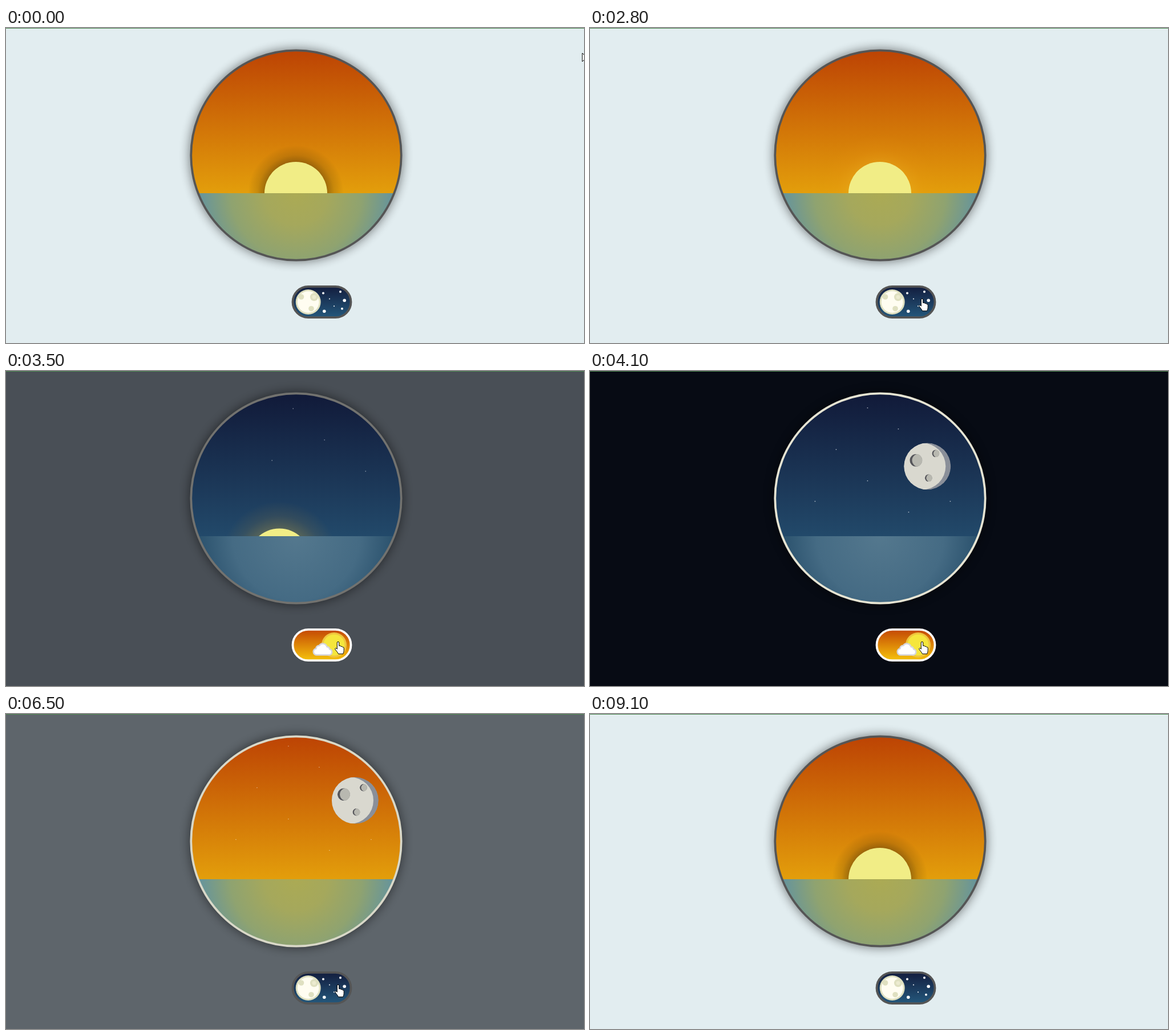
An HTML page that plays this animation: 1013 by 553 pixels, repeating every 9.2 s.

```html
<!DOCTYPE html>
<html lang="en">
<head>
<meta charset="utf-8">
<title>Day and night</title>
<style>
html, body { margin: 0; width: 100%; height: 100%; overflow: hidden; }
svg { display: block; width: 1013px; height: 553px; }
</style>
</head>
<body>
<svg viewBox="0 0 1013 553">
  <defs>
    <linearGradient id="daySky" gradientUnits="userSpaceOnUse" x1="0" y1="41" x2="0" y2="290">
      <stop stop-color="#bd4404"/><stop offset="1" stop-color="#e39e0b"/>
    </linearGradient>
    <linearGradient id="nightSky" gradientUnits="userSpaceOnUse" x1="0" y1="41" x2="0" y2="290">
      <stop stop-color="#111a39"/><stop offset="1" stop-color="#22496a"/>
    </linearGradient>
    <radialGradient id="daySea" gradientUnits="userSpaceOnUse" cx="508.5" cy="290" r="185">
      <stop stop-color="#abaa54"/><stop offset=".3" stop-color="#a5a85c"/>
      <stop offset=".62" stop-color="#8fa370"/><stop offset="1" stop-color="#5a90a8"/>
    </radialGradient>
    <radialGradient id="nightSea" gradientUnits="userSpaceOnUse" cx="508.5" cy="290" r="180">
      <stop stop-color="#54788e"/><stop offset=".62" stop-color="#456b84"/><stop offset="1" stop-color="#274e6a"/>
    </radialGradient>
    <radialGradient id="dark">
      <stop offset=".64" stop-color="#3c280a" stop-opacity=".42"/>
      <stop offset=".8" stop-color="#3c280a" stop-opacity=".16"/>
      <stop offset="1" stop-color="#3c280a" stop-opacity="0"/>
    </radialGradient>
    <radialGradient id="gold">
      <stop offset=".53" stop-color="#f0b428" stop-opacity=".25"/>
      <stop offset=".75" stop-color="#f0a018" stop-opacity=".09"/>
      <stop offset="1" stop-color="#f0a018" stop-opacity="0"/>
    </radialGradient>
    <linearGradient id="dayPill" x2="0" y2="1"><stop stop-color="#c44704"/><stop offset="1" stop-color="#f5c30c"/></linearGradient>
    <linearGradient id="nightPill" x2="0" y2="1"><stop stop-color="#131d3e"/><stop offset="1" stop-color="#24587c"/></linearGradient>
    <filter id="blur" x="-20%" y="-20%" width="140%" height="140%"><feGaussianBlur stdDeviation="9"/></filter>
    <clipPath id="port"><circle cx="508.5" cy="223.5" r="183.5"/></clipPath>
    <clipPath id="disc"><circle r="41"/></clipPath>
  </defs>

  <rect id="back" width="1013" height="553"/>
  <rect width="1013" height="1" fill="#4f8a52"/>
  <circle cx="508.5" cy="223.5" r="187" opacity=".48" filter="url(#blur)"/>

  <g clip-path="url(#port)">
    <rect id="sky" x="320" y="35" width="380" height="256"/>
    <g id="stars" fill="#fff"></g>
    <g id="moon">
      <g clip-path="url(#disc)">
        <circle r="41" fill="#8a8f99"/>
        <circle cx="-9" r="41" fill="#d9d8cf"/>
      </g>
      <g id="craters"></g>
    </g>
    <g id="sun">
      <circle id="goldGlow" r="103" fill="url(#gold)"/>
      <circle id="darkGlow" r="84" fill="url(#dark)"/>
      <circle r="55" fill="#f1ed86"/>
    </g>
    <rect id="sea" x="320" y="290" width="380" height="120"/>
  </g>
  <circle id="ring" cx="508.5" cy="223.5" r="184.2" fill="none" stroke-width="3.7"/>

  <g id="nightButton">
    <rect x="502.5" y="453.8" width="102" height="54.4" rx="27.2" fill="url(#nightPill)" stroke="#555" stroke-width="3.8"/>
    <circle cx="529.7" cy="481" r="22" fill="#dfe0c0"/>
    <circle cx="529.7" cy="481" r="19" fill="#fffdf1"/>
    <g fill="#dfe0c0">
      <circle cx="517.5" cy="472" r="4.8"/><circle cx="540" cy="472.3" r="7"/><circle cx="535" cy="492.7" r="4.8"/>
    </g>
    <circle cx="540" cy="472.3" r="3.4" fill="#ecebd0"/>
    <g id="buttonStars" fill="#fff"></g>
  </g>
  <g id="dayButton">
    <rect x="502.5" y="453.8" width="102" height="54.4" rx="27.2" fill="url(#dayPill)" stroke="#fff" stroke-width="3.8"/>
    <circle cx="575" cy="481" r="22" fill="#efc53f"/>
    <circle cx="575" cy="481" r="18.6" fill="#f5e63c"/>
    <path d="M544 498.500a5.700 5.700 0 0 1-.5-11.300a5 5 0 0 1 5.500-5.200a7.500 7.500 0 0 1 13.500 2.200a4.300 4.300 0 0 1 4.500 4a5.200 5.200 0 0 1-.5 10.300z"
      fill="#fff" stroke="#d6d6dc" stroke-width="2.500" stroke-linejoin="round"/>
  </g>

  <g id="cursor" fill="#fff" stroke="#000" stroke-linejoin="round">
    <path id="arrow" d="M0 0V15l3.500-3.300 2.300 5.300 2.400-1-2.300-5.200h5z"/>
    <path id="hand" d="M-1.700 2a1.700 1.700 0 0 1 3.400 0v5.500q3-1 3.300 1.200q2.500-.8 2.900 1q2.500-.2 2.300 2v4q0 2.500-1.600 6h-8q-1-2.500-5.300-7.500q-1.300-2 .2-2.600q1.300-.3 2.800 1.600z"/>
  </g>
</svg>
<script>
const LOOP = 9200, STEP = 100;
const TO_NIGHT = 3190, TO_DAY = 6280;
const $ = id => document.getElementById(id);
const clamp = v => Math.max(0, Math.min(1, v));
const ramp = (t, from, to) => clamp((t - from) / (to - from));

function bezier(x1, y1, x2, y2) {
  const at = (a, b, s) => 3 * (1 - s) * (1 - s) * s * a + 3 * (1 - s) * s * s * b + s * s * s;
  return x => {
    if (x <= 0 || x >= 1) return clamp(x);
    let lo = 0, hi = 1;
    for (let i = 0; i < 24; i++) {
      const mid = (lo + hi) / 2;
      if (at(x1, x2, mid) < x) lo = mid; else hi = mid;
    }
    return at(y1, y2, lo);
  };
}
const ease = bezier(.25, .1, .25, 1);
const easeInOut = bezier(.42, 0, .58, 1);

// 0 by day, 1 by night
const night = (t, duration, curve) => t < TO_DAY
  ? curve((t - TO_NIGHT) / duration)
  : 1 - curve((t - TO_DAY) / duration);

const mix = (a, b, k) => `rgb(${a.map((v, i) => Math.round(v + (b[i] - v) * k))})`;
const move = (id, x, y) => $(id).setAttribute('transform', `translate(${x} ${y})`);
const show = (id, on) => $(id).setAttribute('visibility', on ? 'visible' : 'hidden');

$('stars').innerHTML = [[472, 78], [526, 115], [417, 151], [472, 206], [380, 242], [617, 242], [544, 261]]
  .map(([x, y]) => `<rect x="${x}" y="${y}" width="1.5" height="1"/>`).join('');
$('buttonStars').innerHTML = [[556, 465.5, 2], [586, 463, 2], [567, 475.5, 1], [593.2, 478.2, 2.8],
  [575, 488.3, 1], [589, 492.7, 2], [557.8, 497.3, 2.8]]
  .map(([x, y, r]) => `<circle cx="${x}" cy="${y}" r="${r}"/>`).join('');
$('craters').innerHTML = [[-20, -10.5, 11], [14.5, -22.5, 6.5], [2, 20.5, 6.5]]
  .map(([x, y, r], i) => `<clipPath id="pit${i}"><circle cx="${x}" cy="${y}" r="${r}"/></clipPath>
    <g clip-path="url(#pit${i})"><circle cx="${x}" cy="${y}" r="${r}" fill="#55555a"/>
    <circle cx="${x + r * .38}" cy="${y}" r="${r}" fill="#b8b8b0"/></g>`).join('');

// time, x, y
const cursorPath = [[0, 1010, 44], [100, 1010, 44], [500, 760, 330], [1000, 597, 452], [1500, 597, 452],
  [2400, 596, 467], [2800, 582, 475], [7250, 582, 475], [7600, 640, 468], [7900, 860, 388],
  [8100, 960, 330], [8200, 985, 282], [8500, 1016, 222], [LOOP, 1016, 222]];

function cursorAt(t) {
  const i = cursorPath.findIndex(p => p[0] > t);
  const [t0, x0, y0] = cursorPath[i - 1], [t1, x1, y1] = cursorPath[i];
  const k = ramp(t, t0, t1);
  return [x0 + (x1 - x0) * k, y0 + (y1 - y0) * k];
}

function draw(t) {
  const isNight = t >= TO_NIGHT && t < TO_DAY;
  const fade = night(t, 500, easeInOut);
  const travel = night(t, 1500, ease);

  $('back').setAttribute('fill', mix([226, 237, 240], [7, 11, 20], fade));
  $('ring').setAttribute('stroke', mix([85, 85, 85], [232, 230, 213], night(t, 1000, easeInOut)));
  $('sky').setAttribute('fill', isNight ? 'url(#nightSky)' : 'url(#daySky)');
  $('sea').setAttribute('fill', isNight ? 'url(#nightSea)' : 'url(#daySea)');
  show('nightButton', !isNight);
  show('dayButton', isNight);

  move('sun', 508 - 93 * travel, 290 + 134 * travel);
  move('moon', 558 + 302 * (1 - travel), 192.5 - 228 * (1 - travel));
  move('stars', 124 * (1 - travel), -124 * (1 - travel));
  $('stars').setAttribute('opacity', fade);

  $('darkGlow').setAttribute('opacity', t < TO_DAY ? 1 - ramp(t, 0, 1000) : ramp(t, 7200, 9000));
  $('goldGlow').setAttribute('opacity', t < TO_DAY ? ramp(t, 0, 1000) : 0);

  const [x, y] = cursorAt(t);
  const overButton = x > 501 && x < 606 && y > 454 && y < 510;
  move('cursor', x, y);
  show('hand', overButton);
  show('arrow', !overButton);
}

const start = performance.now();
function tick() {
  const t = (performance.now() - start) % LOOP;
  draw(Math.floor(t / STEP) * STEP);
  requestAnimationFrame(tick);
}
tick();
</script>
</body>
</html>
```
